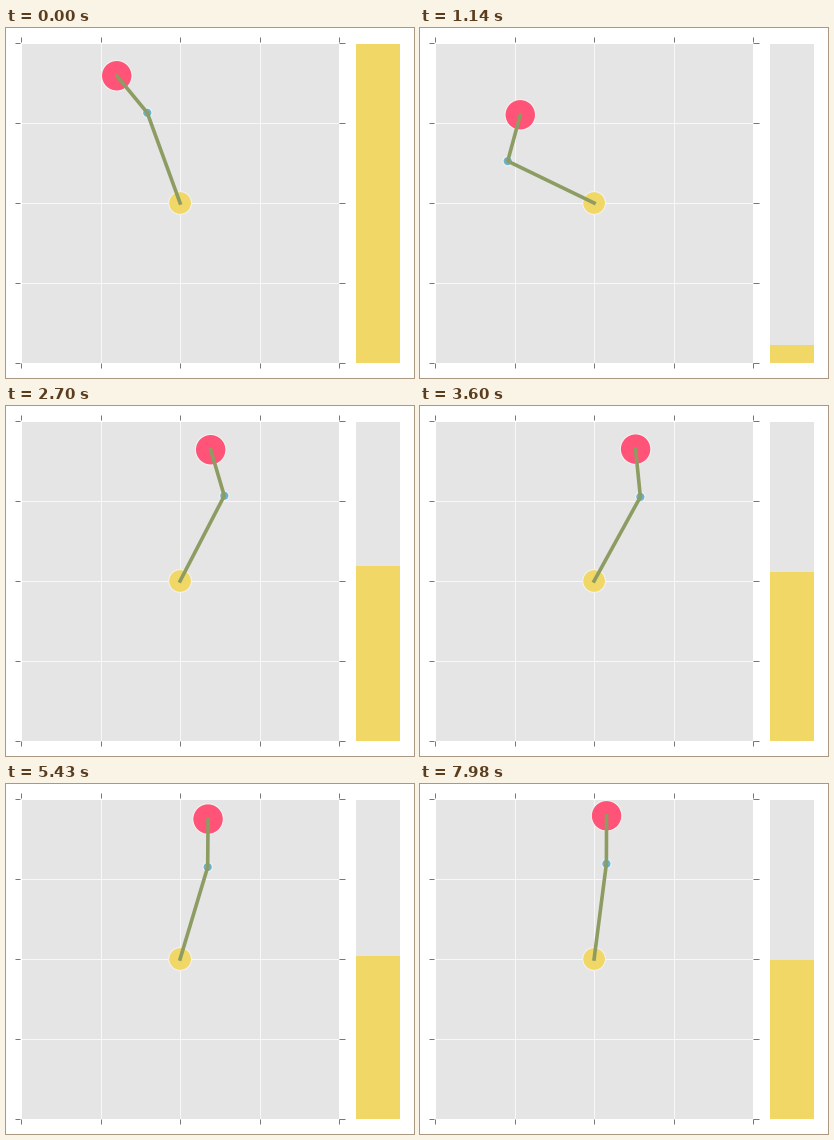
These frames come from a looping animation (408 by 350 pixels, 8000 ms). A matplotlib script:

```python
import numpy as np
import matplotlib.pyplot as plt
from matplotlib.animation import FuncAnimation
from matplotlib.patches import Circle, Rectangle

W, H, DPI = 408, 350, 100
INTERVAL, FRAMES, STEP = 20, 400, 30     # ms, count, ms per pose
PX = 72 / DPI                            # points per pixel

LEFT, RIGHT, TOP, BOTTOM = 15, 333.4, 15, 335
GAUGE_L, GAUGE_R = 349, 394
PIVOT = np.array([174.1, 175.0])
ARM, TIP = 96.0, 48.0                    # rod lengths
GREY, EDGE, GRID, TICK = "#e5e5e5", "#f1f1f1", "#f8f8f8", "#777777"
YELLOW, RED, BLUE, OLIVE = "#f0d766", "#ff5377", "#69b3d0", "#8c9c62"


def pose(t):
    """Rod angles from upright (degrees) and gauge top (pixels) at t seconds."""
    drift = 93 * np.exp(-0.318 * t)      # slow return to upright
    swing = 113 * np.exp(0.806 * t - 0.606 * t * t)
    lower = drift - swing
    wobble = 57.3 * (t - 0.47) * (t - 1.57) * np.exp(0.231 * t - 0.374 * t * t)
    upper = 0.03 * drift - wobble
    push = 199 * np.exp(-((t - 1.05) / 0.42) ** 2)
    kick = 127 * np.exp(-1.4 * t)
    return lower, upper, 179 - 0.41 * drift + push - kick


def rod(length, degrees):
    a = np.radians(degrees)
    return length * np.array([np.sin(a), -np.cos(a)])


fig = plt.figure(figsize=(W / DPI, H / DPI), dpi=DPI, facecolor="white")
ax = fig.add_axes([0, 0, 1, 1])
ax.set_xlim(0, W)
ax.set_ylim(H, 0)
ax.axis("off")


def box(x0, x1, color):
    return ax.add_patch(Rectangle((x0, TOP), x1 - x0, BOTTOM - TOP,
                                  fc=color, lw=0))


def line(xs, ys, color, width=1, z=2):
    return ax.plot(xs, ys, color=color, lw=width * PX, zorder=z,
                   solid_capstyle="butt")[0]


def disc(radius, color):
    return ax.add_patch(Circle(PIVOT, radius, fc=color, ec=EDGE, lw=PX * 1.2,
                               zorder=3))


def border(x0, x1):
    line([x0, x1, x1, x0, x0], [TOP, TOP, BOTTOM, BOTTOM, TOP], "white")


box(LEFT, RIGHT, GREY)
box(GAUGE_L, GAUGE_R, GREY)
gauge = box(GAUGE_L, GAUGE_R, YELLOW)

xs, ys = np.linspace(LEFT, RIGHT, 5), np.linspace(TOP, BOTTOM, 5)
for x, y in zip(xs[1:-1], ys[1:-1]):
    line([x, x], [TOP, BOTTOM], GRID)
    line([LEFT, RIGHT], [y, y], GRID)
border(LEFT, RIGHT)
border(GAUGE_L, GAUGE_R)
for x, y in zip(xs, ys):
    line([x, x], [TOP - 6, TOP - 1], TICK)
    line([x, x], [BOTTOM, BOTTOM + 5], TICK)
    line([LEFT - 6, LEFT - 1], [y, y], TICK)
    line([RIGHT, RIGHT + 5.5], [y, y], TICK)

disc(11.4, YELLOW)
joint = disc(4.7, BLUE)
bob = disc(15.3, RED)
rods = line([], [], OLIVE, 3.6, 4)
rods.set_solid_capstyle("projecting")
rods.set_solid_joinstyle("round")


def draw(k):
    t = k * INTERVAL // STEP * STEP / 1000
    lower, upper, top = pose(t)
    elbow = PIVOT + rod(ARM, lower)
    end = elbow + rod(TIP, upper)
    joint.center = tuple(elbow)
    bob.center = tuple(end)
    rods.set_data(*np.array([PIVOT, elbow, end]).T)
    top = np.clip(top, TOP, BOTTOM)
    gauge.set_y(top)
    gauge.set_height(BOTTOM - top)
    return gauge, joint, bob, rods


anim = FuncAnimation(fig, draw, frames=FRAMES, interval=INTERVAL,
                     repeat=True, repeat_delay=0, blit=False)
plt.show()
```
